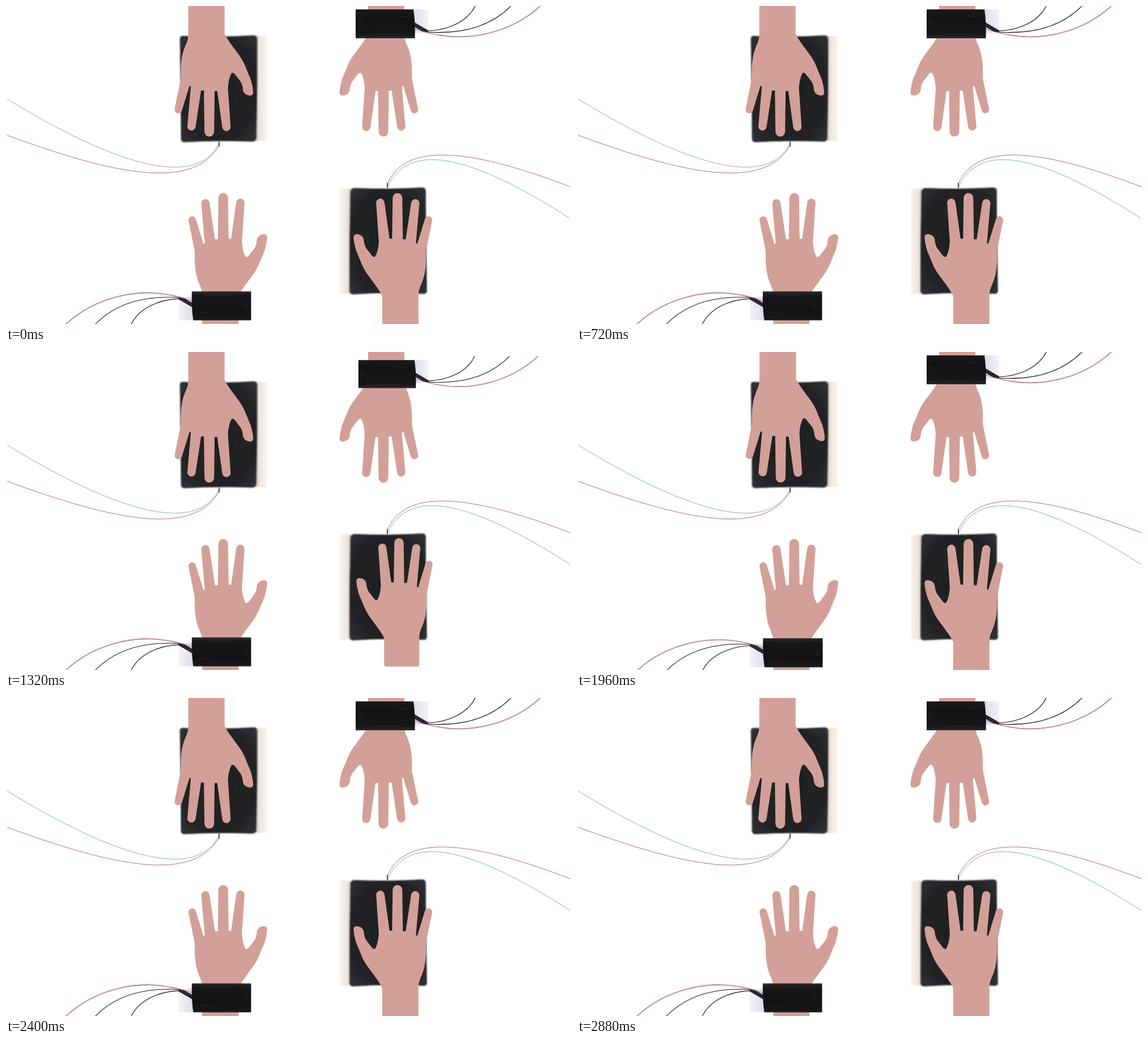
Animation, 997 px wide and 561 px high, one loop 3.4 s. Source, as an HTML page:

```html
<!DOCTYPE html>
<html lang="en">
<head>
<meta charset="utf-8">
<title>Paired hands</title>
<style>
html, body { margin: 0; width: 100%; height: 100%; overflow: hidden; background: #fff; }
svg { display: block; width: 997px; height: 561px; }
.wire { fill: none; stroke-width: 1; }
.rose { stroke: #ad6c7a; }
.sage { stroke: #8bada1; }
.ink { stroke: #111; stroke-width: 1.1; }
.lead { stroke: #5b4b4a; stroke-width: 2; }
</style>
</head>
<body>
<svg viewBox="0 0 997 561">
  <defs>
    <linearGradient id="paper">
      <stop offset="0" stop-color="#cfc4bb"/>
      <stop offset=".35" stop-color="#efe6de"/>
      <stop offset="1" stop-color="#f8f1ea"/>
    </linearGradient>
    <radialGradient id="leather" cx=".5" cy=".5" r=".72">
      <stop offset="0" stop-color="#1d1e20"/>
      <stop offset=".7" stop-color="#232426"/>
      <stop offset="1" stop-color="#323438"/>
    </radialGradient>
    <linearGradient id="strap" x2="0" y2="1">
      <stop offset="0" stop-color="#1a1a1d"/>
      <stop offset=".3" stop-color="#121214"/>
      <stop offset=".85" stop-color="#161618"/>
      <stop offset="1" stop-color="#2b2b30"/>
    </linearGradient>
    <linearGradient id="haze">
      <stop offset="0" stop-color="#dcdce8"/>
      <stop offset="1" stop-color="#f3f2f9"/>
    </linearGradient>
    <filter id="soft" x="-10%" y="-10%" width="120%" height="120%">
      <feGaussianBlur stdDeviation=".8"/>
    </filter>

    <path id="hand" fill="#d2a098" d="M321 1 Q321 -3 325 -3 H381 Q385 -3 385 1
      V49 Q389 57 394 64 L413 90 Q420 101 423 110 L431 129 Q435 143 435.5 152 Q436 158 429 158
      Q420 157 417.5 149 Q417 139 413 133 L403 120 Q400 117 397.5 118 Q392 127 391 145 L395.5 212
      A7.3 7.3 0 0 1 381 214.5 L372 150 H367.5 L366.5 222 A8.5 8.5 0 0 1 349.5 222
      L348.5 149 H343.5 L333.7 214 A7.3 7.3 0 0 1 319.3 212 L325.5 142 L323 141
      L309.7 184.5 A6.5 6.5 0 0 1 297 181 L307.8 128 Q307 104 310 89 Q312 78 318 65 Q321 58 321 50 Z"/>

    <g id="pad">
      <rect x="441" y="53" width="19" height="185" fill="url(#paper)" filter="url(#soft)"/>
      <path fill="url(#leather)" stroke="#36393e" stroke-width=".8" filter="url(#soft)"
        d="M312 53 Q374 56 437 52 Q443 52 443 59 Q443.5 145 441.5 233 Q441 239 434 239
        Q376 236.5 315 240 Q309 240 309 234 Q309 145 307 58 Q307 53 312 53 Z"/>
    </g>

    <g id="band">
      <rect x="718" y="6" width="27" height="41.5" fill="url(#haze)"/>
      <path fill="#2a282c" d="M721 29 L745 43 V47 L735 45 L721 37 Z"/>
      <path class="wire rose" d="M721 40 L732 44 L745 47.5"/>
      <path fill="url(#strap)" d="M617 6 H719 Q722.5 28 721.5 57 H617 Z"/>
      <path class="wire" stroke="#2c2c30" d="M622 27 l3 10 M626 25 l5 11 M690 17 q8 4 18 2 M650 50 h45"/>
      <path class="wire ink" d="M744 44 C785 42 816 25 828.5 -1"/>
      <path class="wire ink" d="M744 46 C805 50 856 36 892 -1"/>
      <path class="wire rose" style="stroke-width:1.8" d="M744 47 C815 66 892 47 944 -1"/>
      <path class="wire" stroke="#d9c8cd" style="stroke-width:.6" d="M744 47 C815 66 892 47 944 -1"/>
    </g>

    <g id="pair">
      <use href="#band"/>
      <use href="#hand" transform="rotate(180 524.4 280.2)"/>
    </g>
  </defs>

  <rect width="997" height="561" fill="#fff"/>
  <use href="#pad"/>
  <use href="#pad" transform="rotate(180 524.75 280.2)"/>

  <path class="wire sage" d="M2 164 C186 277 336 326 376 242"/>
  <path class="wire rose" d="M2 228 C190 297 330 327 376 246"/>
  <path class="lead" d="M376 239 V248"/>
  <path class="wire rose" d="M673 314 C700 250 790 240 996 319"/>
  <path class="wire sage" d="M673 320 C700 262 770 230 995 374.5"/>
  <path class="lead" d="M673 312 V321"/>

  <use href="#hand" transform="translate(1024 0) scale(-1 1)"/>
  <use href="#hand" transform="translate(25.3 560.4) scale(1 -1)"/>

  <use id="right" href="#pair"/>
  <g transform="rotate(180 524.75 280.2)"><use id="left" href="#pair"/></g>
</svg>
<script>
const LOOP = 3400, STEP = 40, CYCLE = 480, ROUNDS = 2;
const right = document.getElementById('right');
const left = document.getElementById('left');

// Each cycle swells a little, then shrinks about twice as far.
function pulse(t) {
  if (t <= 0 || t >= CYCLE * ROUNDS) return 1;
  const wave = Math.sin(2 * Math.PI * t / CYCLE);
  return 1 + wave * (wave > 0 ? 0.0135 : 0.03);
}

function pose(el, scale) {
  el.setAttribute('transform', `translate(779 281) scale(${scale}) translate(-779 -281)`);
}

function draw(now) {
  const t = Math.floor((now % LOOP) / STEP) * STEP;
  pose(right, pulse(t - 480));
  pose(left, pulse(t - 1920));
  requestAnimationFrame(() => draw(performance.now() - start));
}

const start = performance.now();
draw(0);
</script>
</body>
</html>
```
